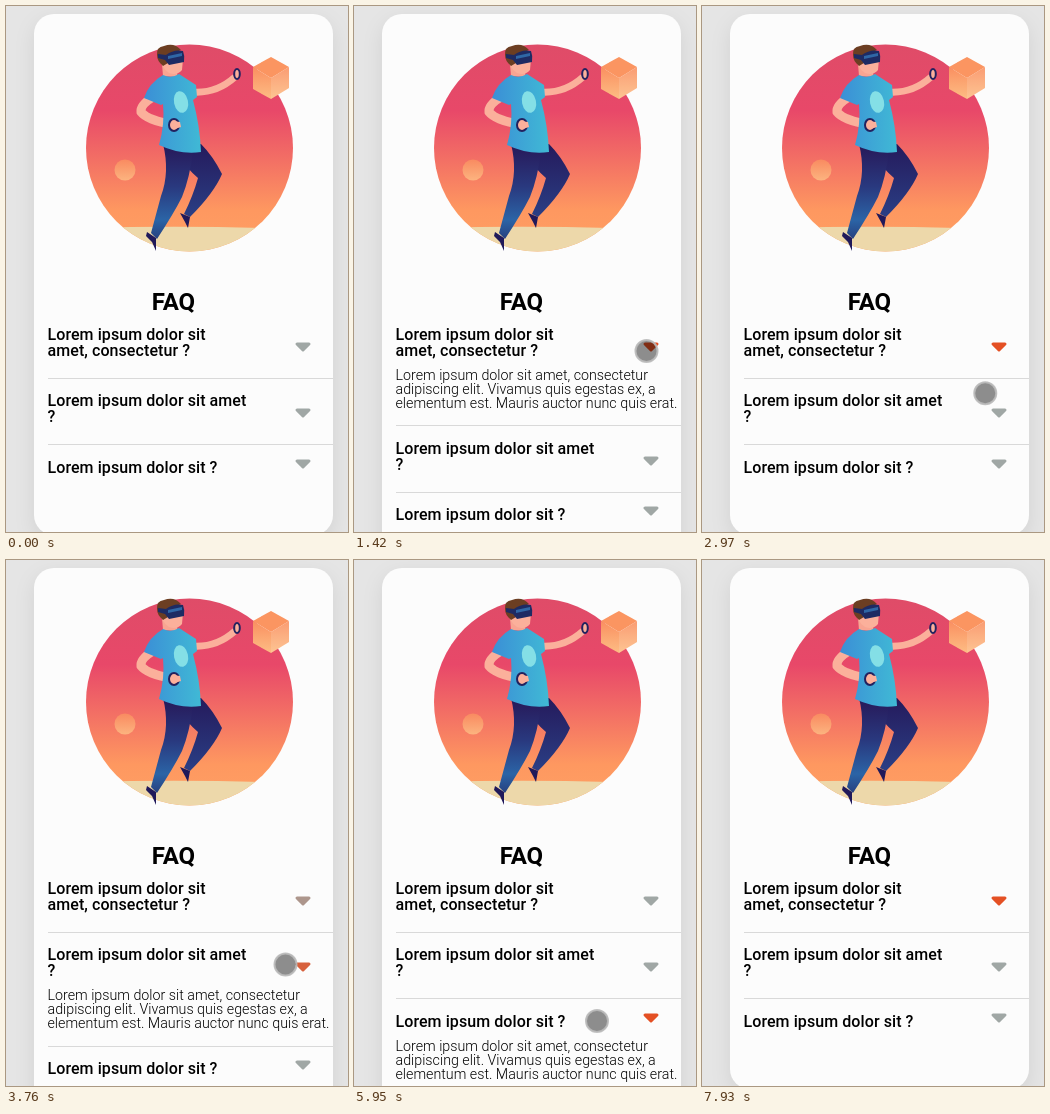
An HTML page for the animation above (8.28 s loop, 342 px wide and 526 px high).

```html
<!DOCTYPE html>
<html lang="en">
<head>
<meta charset="utf-8">
<title>FAQ</title>
<style>
  html, body { margin: 0; height: 100%; overflow: hidden; background: #e5e5e5; }
  svg { display: block; }
  text { font-family: Roboto, Arial, sans-serif; }
  .card { fill: #fcfcfc; filter: drop-shadow(0 7px 10px rgba(0, 0, 0, .08)); }
  .heading { font-size: 24px; font-weight: 700; text-anchor: middle; }
  .question { font-size: 16px; font-weight: 500; letter-spacing: .07px; }
  .answer { font-size: 14.25px; font-weight: 300; }
  .arrow { stroke-width: 3px; stroke-linejoin: round; }
  .rule { fill: #d9d9d9; }
  .skin { fill: #fbb09b; }
  .arm { fill: none; stroke: #fbb09b; }
  .navy { fill: #20195a; }
  .band { stroke: #23225f; stroke-width: 2px; }
</style>
</head>
<body>
<svg width="342" height="526" viewBox="0 0 342 526">
  <defs>
    <linearGradient id="sky" x2="0" y2="1">
      <stop offset="0" stop-color="#df4c68"/><stop offset=".32" stop-color="#e84869"/>
      <stop offset=".8" stop-color="#fe9860"/><stop offset="1" stop-color="#ffa064"/>
    </linearGradient>
    <linearGradient id="shirt">
      <stop offset="0" stop-color="#3b8fd6"/><stop offset="1" stop-color="#40b9d5"/>
    </linearGradient>
    <linearGradient id="leg" x2="0" y2="1">
      <stop offset="0" stop-color="#271858"/><stop offset=".45" stop-color="#29397f"/>
      <stop offset=".8" stop-color="#2b64a6"/><stop offset="1" stop-color="#27407f"/>
    </linearGradient>
    <linearGradient id="backLeg" x2="0" y2="1">
      <stop offset="0" stop-color="#251a5c"/><stop offset="1" stop-color="#2a3f85"/>
    </linearGradient>
    <linearGradient id="glow" x2="0" y2="1">
      <stop offset="0" stop-color="#fa8f60"/><stop offset="1" stop-color="#fdbd84"/>
    </linearGradient>
    <clipPath id="disc"><circle cx="183.5" cy="142" r="103.5"/></clipPath>
  </defs>

  <rect id="card" class="card" x="28" y="8" width="299" rx="20"/>

  <g clip-path="url(#disc)">
    <path fill="url(#sky)" d="M80 38h207v208H80z"/>
    <path fill="#edd8aa" d="M80 222Q183 219 287 223V250H80z"/>
  </g>
  <circle cx="119" cy="164" r="10.5" fill="url(#glow)" opacity=".85"/>

  <path fill="#fb9561" d="M265 51l18 10-18 11-18-11z"/>
  <path fill="url(#glow)" d="M247 61l18 11v21l-18-10z"/>
  <path fill="url(#glow)" d="M283 61l-18 11v21l18-11z"/>
  <path fill="#fff" opacity=".12" d="M283 61l-18 11v21l18-11z"/>

  <!-- player -->
  <path fill="url(#backLeg)" d="M172 140L195 138Q207 150 216 168Q208 187 184 211L178 208Q187 190 192 172Q181 163 176 152z"/>
  <path class="navy" d="M174 207l10 4-2 11-3-6z"/>
  <path fill="url(#leg)" d="M157 138Q164 166 155 190L145 227L151 233Q168 207 176 191Q184 171 187 145z"/>
  <path class="navy" d="M141 226l9 6v13l-4-9-6-6z"/>
  <path class="arm" stroke-width="7" d="M186 86Q210 88 229 71"/>
  <path class="arm" stroke-width="9" d="M147 91Q134 99 135 106Q141 114 168 119"/>
  <path fill="#f8a592" d="M156 58h16l-1 13-14-1z"/>
  <path fill="url(#shirt)" d="M157 69Q165 73 173 68L190 79L191 91L187 94Q194 120 195 146Q174 149 153 139Q159 118 157 98L155 99L138 92Q143 77 157 69z"/>
  <path class="skin" d="M153 49l24 4-1 11q-5 6-13 3-8-5-10-18z"/>
  <path fill="#6c3e22" d="M151 49q-1-8 7-9 10-4 17 4l-14 6 1 7-5 3q-6-5-6-11z"/>
  <path fill="#1e2b63" d="M152 48l8 1q8-6 17-4 2 5 1 11l-15 3-4-5-7-2z"/>
  <path fill="#2f67a6" d="M162 50l14-3v3l-14 3z"/>
  <ellipse cx="175" cy="96" rx="7" ry="11" fill="#84dfe6" transform="rotate(-12 175 96)"/>
  <ellipse class="skin band" cx="168" cy="119" rx="5" ry="6"/>
  <path class="skin" d="M167 115l7 1 1 5-6 2z"/>
  <ellipse class="skin band" cx="231" cy="68" rx="2.8" ry="5"/>

  <text class="heading" x="167.5" y="304">FAQ</text>
  <g id="list"></g>
  <circle id="cursor" r="11" stroke-width="2"/>
</svg>
<script>
const LOOP = 8280, PITCH = 66.4, ANSWER = 47.4;
const LAG = 60, SLIDE = 250, FADE = 350;
const GREY = [160, 167, 165], RED = [228, 80, 36];
const $ = id => document.getElementById(id);

const questions = [
  ['Lorem ipsum dolor sit', 'amet, consectetur ?'],
  ['Lorem ipsum dolor sit amet', '?'],
  ['Lorem ipsum dolor sit ?']
];
const answer = [
  'Lorem ipsum dolor sit amet, consectetur',
  'adipiscing elit. Vivamus quis egestas ex, a',
  'elementum est. Mauris auctor nunc quis erat.'
];

// Each click is [time, row]; each move is [start, end, x, y]
const clicks = [[900, 0], [1740, 0], [3450, 1], [4240, 1], [5480, 2], [6960, 0], [7530, 0]];
const entry = { x: 238, y: 540, bulge: 50 };
const moves = [
  [70, 880, 292.5, 345], [1990, 3370, 279.5, 404.5], [4600, 5340, 243, 461],
  [6190, 6960, 220, 343], [7600, 7910, 326, 545]
];

const ramp = (t, from, to) => Math.min(1, Math.max(0, (t - from) / (to - from)));
const smooth = p => p * p * (3 - 2 * p);

// A click focuses its row and toggles its panel; every other row is released.
function level(row, t, duration, toggles) {
  let on = false, sum = 0;
  for (const [time, target] of clicks) {
    const next = target === row && !(toggles && on);
    sum += (next - on) * smooth(ramp(t, time + LAG, time + LAG + duration));
    on = next;
  }
  return sum;
}

function cursorAt(t) {
  let { x, y, bulge } = entry;
  const arc = bulge * Math.sin(Math.PI * ramp(t, moves[0][0], moves[0][1]));
  for (const [from, to, endX, endY] of moves) {
    const p = ramp(t, from, to);
    x += (endX - x) * p;
    y += (endY - y) * p;
  }
  return [x + arc, y];
}

const lines = (list, cls, y, step) => list.map((s, i) =>
  `<text class="${cls}" x="41.5" y="${y + i * step}">${s}</text>`).join('');

$('list').innerHTML = questions.map((q, i) => {
  const lift = (2 - q.length) * 16;
  return `<g>${lines(q, 'question', 334, 16)}
    <path class="arrow" d="M291 ${338 - lift}h12l-6 6z"/>
    <svg class="body" y="${360 - lift}" width="342">${lines(answer, 'answer', 14, 14)}</svg>
    ${i < 2 ? '<rect class="rule" x="42" width="285" height="1"/>' : ''}</g>`;
}).join('');

const rows = [...$('list').children].map(group => ({
  group,
  arrow: group.querySelector('.arrow'),
  body: group.querySelector('.body'),
  rule: group.querySelector('.rule')
}));

function draw(t) {
  let grown = 0;
  rows.forEach(({ group, arrow, body, rule }, i) => {
    const height = ANSWER * level(i, t, SLIDE, true);
    const focus = level(i, t, FADE, false);
    const top = Math.round(PITCH * i + grown);
    grown += height;
    group.setAttribute('transform', `translate(0 ${top})`);
    body.setAttribute('height', height);
    arrow.style.fill = arrow.style.stroke =
      `rgb(${GREY.map((c, k) => Math.round(c + (RED[k] - c) * focus))})`;
    rule?.setAttribute('y', 372 + Math.round(PITCH * i + grown) - top);
  });
  $('card').setAttribute('height', 521 + grown);

  const pressed = clicks.some(([time]) => t >= time && t < time + 90);
  const cursor = $('cursor');
  cursor.setAttribute('transform', `translate(${cursorAt(t)})`);
  cursor.setAttribute('fill', pressed ? 'rgba(180,182,10,.78)' : 'rgba(0,0,0,.44)');
  cursor.setAttribute('stroke', pressed ? 'rgba(222,223,120,.95)' : 'rgba(186,186,186,.9)');
}

const start = performance.now();
function tick() {
  draw((performance.now() - start) % LOOP);
  requestAnimationFrame(tick);
}
tick();
</script>
</body>
</html>
```
